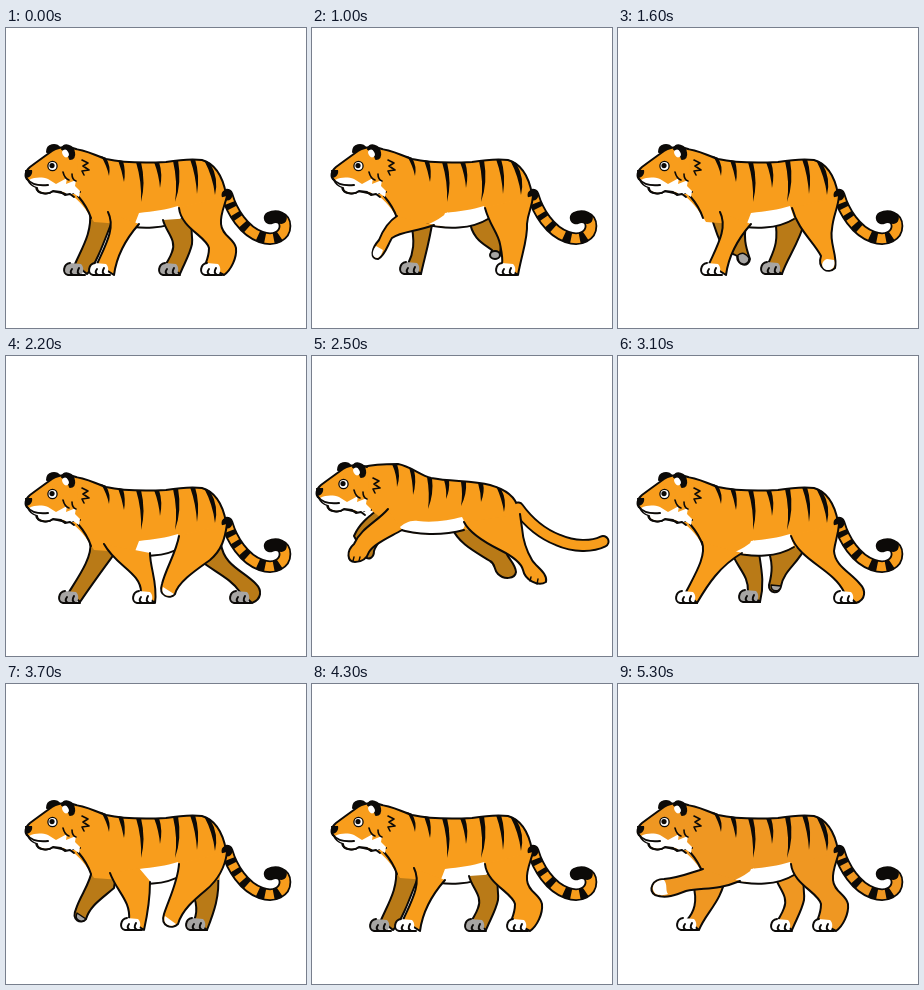
Recreate the animation shown at these times as an HTML page. Size 300 px wide and 300 px high, loop 5.8 s.

```html
<!DOCTYPE html>
<html lang="en">
<head>
<meta charset="utf-8">
<title>Walking tiger</title>
<style>
html, body { margin: 0; width: 100%; height: 100%; overflow: hidden; background: #fff; }
svg {
  display: block; width: 100vw; height: 100vh;
  --coat: #f89d1c; --far: #b97a17; --toe: #fff; --far-toe: #a7a5a3;
  fill: none; stroke: #0c0a08; stroke-width: 2;
  stroke-linejoin: round; stroke-linecap: round;
}
.n { fill: var(--coat); }
.f { fill: var(--far); }
.far { --toe: var(--far-toe); }
.toe { fill: var(--toe); }
.w { fill: #fff; }
.k { fill: #0c0a08; }
.flat { stroke: none; }
.fur { stroke: var(--coat); }

/* Poses switch hard, one at a time */
.pose { visibility: hidden; animation: 5800ms step-end infinite; }
#stand { animation-name: stand; }
#leap { animation-name: leap; }
#lift { animation-name: lift; --coat: #ef9722; --far: #ef9722; --far-toe: #fff; }
.step { animation-name: step; animation-delay: calc(var(--i) * 300ms); }
@keyframes stand {
  0%, 74.137% { visibility: visible; }
  17.241%, 91.379%, 100% { visibility: hidden; }
}
@keyframes step {
  0%, 22.413%, 53.448%, 100% { visibility: hidden; }
  17.241%, 48.275% { visibility: visible; }
}
@keyframes leap {
  0%, 48.275%, 100% { visibility: hidden; }
  43.103% { visibility: visible; }
}
@keyframes lift {
  0% { visibility: hidden; }
  91.379%, 100% { visibility: visible; }
}
</style>
</head>
<body>
<svg viewBox="0 0 300 300">
<defs>
  <g id="paw">
    <path class="toe flat" d="M6,-12 C-1,-11 -2,-1 4,0 H17 C20,-3 20,-8 17,-11 Z"/>
    <path d="M6,-12 C-1,-11 -2,-1 4,0 H21 M8,-6 Q5,-2 9,0 M15,-7 Q12,-2 16,0"/>
  </g>

  <g id="head">
    <path class="k" d="M41,124 C41,116 50,115 54,120 L50,124 Z"/>
    <path class="n" d="M70,121 C62,118 53,119 46,123 C39,128 32,133 24,139 C19,143 18,149 22,152 C24,156 27,158 30,159 C31,166 42,167 47,163 L60,166 L74,164"/>
    <path class="w flat" d="M23,152 C29,149 36,149 42,151 L50,156 L61,150 L60,156 L70,152 L69,158 L74,163 L73,169 L67,165 L64,168 L58,164 L48,163 C42,166 32,165 31,159 C27,158 24,155 23,152 Z"/>
    <path class="k flat" d="M19,142 L26,142 C27,146 24,150 20,150 Z"/>
    <path d="M21,151 C25,156 33,158 42,157 M31,160 C31,166 42,167 47,163 L55,164 L59,167 L64,166 L68,169"/>
    <path d="M57,144 C58,148 60,151 63,152 M66,146 C66,150 67,152 70,153" stroke-width="1.6"/>
    <path d="M76,132 L82,135 L77,138 L83,142 L76,143 L78,147" stroke-width="1.6"/>
    <ellipse class="w" cx="46.5" cy="138" rx="4.6" ry="4.6" stroke-width="1.3"/>
    <circle class="k flat" cx="46" cy="137.6" r="2.6"/>
    <path class="k" d="M56,121 C58,115 67,117 68,124 C69,129 67,131 64,131 C63,126 60,123 56,121 Z"/>
    <ellipse class="w flat" cx="59.5" cy="125.5" rx="3" ry="4" transform="rotate(-30 59.5 125.5)"/>
  </g>

  <path id="tail" pathLength="100" d="M221,167 C226,184 238,203 255,209 C269,214 279,207 279,198 C279,189 270,187 264,190"/>
  <path id="spine" d="M67,121 C78,121 88,127 100,131 C118,135 140,135 160,134 C178,131 188,131 196,132 C210,136 217,150 220,166"/>

  <g id="body">
    <use href="#tail" stroke-width="12.6"/>
    <path class="n flat" d="M67,121 C78,121 88,127 100,131 C118,135 140,135 160,134 C178,131 188,131 196,132 C210,136 217,150 220,168 L213,196 L174,191 C160,200 135,202 115,196 L88,194 C80,181 74,173 64,166 L56,150 Z"/>
    <path class="w flat" d="M128,198 L133,185 C148,183 160,182 172,178 L176,190 C160,201 142,201 128,198 Z"/>
    <use href="#spine"/>
    <path d="M176,191 C160,201 135,202 113,196 M72,168 C78,175 82,181 85,190"/>
    <use href="#tail" class="fur" stroke-width="9"/>
    <use href="#tail" stroke-width="11" stroke-linecap="butt" stroke-dasharray="0 8 5 6 5 7 6 12 7 8 6 200"/>
    <use href="#tail" stroke-width="11" stroke-dasharray="0 89 40"/>
    <path class="k flat" d="M95,128 L100,130 Q105,138 103,148 Q101,138 95,128 M112,132 L117,133 Q120,143 118,154 Q116,143 112,132 M130,134 L135,134 Q140,155 135,174 Q136,154 130,134 M148,134 L153,134 Q157,146 154,160 Q153,147 148,134 M167,133 L172,132 Q176,155 169,174 Q172,154 167,133 M184,131 L189,131 Q194,147 191,166 Q190,148 184,131 M198,132 L204,135 Q213,150 209,167 Q207,149 198,132"/>
    <use href="#head"/>
  </g>
  <path id="wedge" class="w flat" d="M117,196 Q128,191 136,184 L132,198 Q124,198 117,196 Z"/>

  <g id="fore">
    <path class="n" d="M102,184 C110,200 99,218 91,236 L108,247 C110,232 118,213 133,196"/>
    <use href="#paw" x="83" y="247"/>
  </g>
  <g id="hind" class="far">
    <path class="f" d="M157,192 C160,204 171,212 166,224 C164,230 162,232 160,236 L174,246 C178,236 184,226 186,216 C187,208 184,202 186,190"/>
    <use href="#paw" x="153" y="247"/>
  </g>
  <g id="rump">
    <path class="n" d="M173,180 C175,200 201,209 203,220 C203,228 201,232 199,237 L218,247 C225,242 231,230 230,220 C228,210 216,208 215,196 C214,186 219,177 221,168"/>
    <use href="#paw" x="195" y="247"/>
  </g>
</defs>

<g id="stand" class="pose">
  <g class="far">
    <path class="f" d="M84,184 C86,204 77,218 69,236 L81,246 C88,240 96,220 108,188"/>
    <use href="#paw" x="58" y="247"/>
  </g>
  <use href="#body"/>
  <use href="#fore"/>
  <use href="#hind" display="none"/>
  <use href="#hind"/>
  <use href="#body" display="none"/>
  <use href="#rump"/>
</g>

<g class="pose step" style="--i:0">
  <g class="far">
    <path class="f" d="M157,190 C160,212 172,216 180,222 C176,230 187,234 188,226 L192,190"/>
    <ellipse class="toe" cx="183" cy="227" rx="5" ry="4"/>
    <path class="f" d="M98,190 C104,215 101,226 96,236 L109,246 C113,228 118,212 121,190"/>
    <use href="#paw" x="88" y="246"/>
  </g>
  <use href="#body"/>
  <use href="#wedge"/>
  <path class="n" d="M85,188 C77,193 71,202 67,212 C59,221 58,231 66,231 C73,228 76,216 80,210 C90,203 104,204 122,197"/>
  <path class="w flat" d="M64,218 C59,224 60,230 66,230 C69,228 70,225 71,222 Z"/>
  <path class="n" d="M173,180 C178,198 186,205 188,216 C190,226 191,230 190,236 L206,247 C210,225 216,210 215,196 C216,184 220,180 221,168"/>
  <use href="#paw" x="184" y="247"/>
</g>

<g class="pose step" style="--i:1">
  <g class="far">
    <path class="f" d="M111,190 C118,212 131,218 130,236 L142,246 C147,226 143,212 140,190"/>
    <use href="#paw" x="121" y="246"/>
    <path class="f" d="M148,190 C156,205 154,218 151,229 C150,238 162,239 163,230 C166,214 180,208 188,190"/>
    <path class="toe" d="M153,229 C153,237 162,236 163,230 Z" stroke-width="1.4"/>
  </g>
  <use href="#body"/>
  <use href="#wedge"/>
  <path class="n" d="M84,186 C89,200 76,220 68,236 L79,247 C90,228 102,210 124,197"/>
  <use href="#paw" x="58" y="247"/>
  <path class="n" d="M173,180 C182,205 215,213 226,236 L238,247 C248,244 248,234 242,228 C232,216 217,210 216,195 C217,186 220,180 221,168"/>
  <use href="#paw" x="216" y="247"/>
</g>

<g class="pose step" style="--i:2">
  <g class="far">
    <path class="f" d="M88,180 C97,192 97,208 106,220 C112,226 116,226 119,228 C119,238 131,240 132,231 C128,220 124,208 130,190"/>
    <path class="toe" d="M120,227 C119,238 131,239 131,230 C128,225 124,224 120,227 Z" stroke-width="1.4"/>
    <path class="f" d="M157,190 C161,215 156,222 150,236 L164,246 C169,230 180,218 188,190"/>
    <use href="#paw" x="143" y="246"/>
  </g>
  <use href="#body"/>
  <use href="#fore"/>
  <path class="n" d="M174,180 C180,202 196,214 203,228 C199,240 210,247 217,240 C220,228 211,215 214,201 C215,188 220,180 221,168"/>
  <path class="w flat" d="M209,231 C201,234 204,243 211,242 C217,241 217,235 216,232 Z"/>
</g>

<g class="pose step" style="--i:3">
  <g class="far">
    <path class="f" d="M86,186 C84,200 74,212 70,225 C65,236 75,241 80,235 C84,222 94,216 108,204 L110,190"/>
    <path class="toe" d="M71,229 C68,237 76,239 80,235 Z" stroke-width="1.4"/>
    <path class="f" d="M180,190 C190,215 193,226 188,236 L201,246 C208,228 214,212 212,190"/>
    <use href="#paw" x="180" y="246"/>
  </g>
  <use href="#body"/>
  <path class="n" d="M104,189 C111,208 125,217 123,236 L138,246 C142,228 144,215 144,197 L133,184" stroke="none"/>
  <path d="M104,189 C111,208 125,217 123,236 L138,246 C142,228 144,215 144,198"/>
  <use href="#paw" x="115" y="246"/>
  <path class="n" d="M173,180 C172,197 163,215 158,230 C154,242 166,246 172,240 C176,226 188,216 200,206 C212,196 219,184 221,168"/>
  <path class="w flat" d="M159,232 C156,241 165,244 170,240 Z"/>
</g>

<g class="pose step" style="--i:4">
  <g class="far">
    <path class="f" d="M84,186 C87,200 73,220 63,236 L74,246 C86,228 98,212 114,190"/>
    <use href="#paw" x="53" y="247"/>
    <path class="f" d="M180,190 C196,212 222,218 234,236 L246,247 C256,243 256,234 250,228 C238,215 218,210 215,188"/>
    <use href="#paw" x="224" y="247"/>
  </g>
  <use href="#body"/>
  <path class="n" d="M98,188 C110,210 135,217 135,236 L149,247 C152,228 144,212 144,197"/>
  <use href="#paw" x="127" y="247"/>
  <path class="n" d="M173,180 C170,197 160,212 156,228 C152,240 164,244 169,238 C172,226 190,214 204,204 C216,194 219,182 221,168"/>
  <path class="w flat" d="M157,231 C154,239 163,242 168,238 Z"/>
</g>

<g id="leap" class="pose">
  <path class="f" d="M140,172 C147,188 164,196 178,205 C184,208 181,213 186,218 C192,224 203,223 204,216 C203,207 196,203 194,196 L188,176"/>
  <path class="f" d="M68,152 C57,160 47,168 42,180 L53,200 C56,205 62,202 62,195 C64,188 72,180 80,168"/>
  <path d="M206,152 C214,163 228,177 246,184 C262,191 280,191 291,185.500" stroke-width="13"/>
  <path class="n flat" d="M36,112 L54,111 C62,108 74,108 86,108 C98,110 108,119 119,122 C140,126 160,124 178,129 C196,134 205,143 208,154 L200,188 L165,170 C140,178 110,182 88,174 L72,164 L56,152 L36,140 Z"/>
  <path class="w flat" d="M86,173 C92,167 98,164 106,165 C122,167 138,164 150,161 C154,168 154,173 147,175 C125,180 104,179 86,173 Z"/>
  <path d="M51,111 C62,108 74,108 86,108 C98,110 108,119 119,122 C140,126 160,124 178,129 C196,134 204,143 206,152 M152,174 C130,180 104,179 86,173"/>
  <path class="fur" d="M206,152 C214,163 228,177 246,184 C262,191 280,191 291,185.500" stroke-width="9.200"/>
  <path class="k flat" d="M80,108 L85,108 Q89,120 85,131 Q85,119 80,108 M97,111 L102,114 Q105,126 101,139 Q101,125 97,111 M115,121 L120,122 Q122,138 116,153 Q118,137 115,121 M132,124 L137,124 Q138,134 134,143 Q135,134 132,124 M149,126 L154,126 Q155,138 149,150 Q151,138 149,126 M166,127 L171,127 Q173,136 169,146 Q169,137 166,127 M184,130 L189,133 Q195,144 192,156 Q190,143 184,130"/>
  <use href="#head" x="-15" y="-10"/>
  <path class="n" d="M76,153 C66,165 49,172 42,188 C34,195 35,206 43,206 C50,206 55,202 57,196 C62,188 76,182 90,174"/>
  <path d="M42,201 L41,205 M48,201 L47,205" stroke-width="1.4"/>
  <path class="n" d="M152,166 C158,178 174,187 188,194 C200,200 209,206 211,214 C213,224 226,231 234,226 C236,217 224,211 220,204 C214,194 211,184 210,172 L208,158"/>
  <path d="M219,221 L218,225 M226,223 L225,228" stroke-width="1.4"/>
</g>

<g id="lift" class="pose">
  <use href="#hind"/>
  <g class="far">
    <path class="f" d="M75,200 C80,218 76,228 69,236 L81,246 C88,228 104,218 108,190"/>
    <use href="#paw" x="59" y="246"/>
  </g>
  <use href="#body"/>
  <use href="#wedge"/>
  <path class="n" d="M85,185 C72,189 60,194 46,195 C34,195 30,206 37,211 C48,215 58,211 68,207 C85,203 98,207 122,197"/>
  <path class="w flat" d="M46,196 C35,196 32,205 38,210 C43,212 47,211 50,210 C47,206 50,201 46,196 Z"/>
  <use href="#rump"/>
</g>
</svg>
</body>
</html>
```
